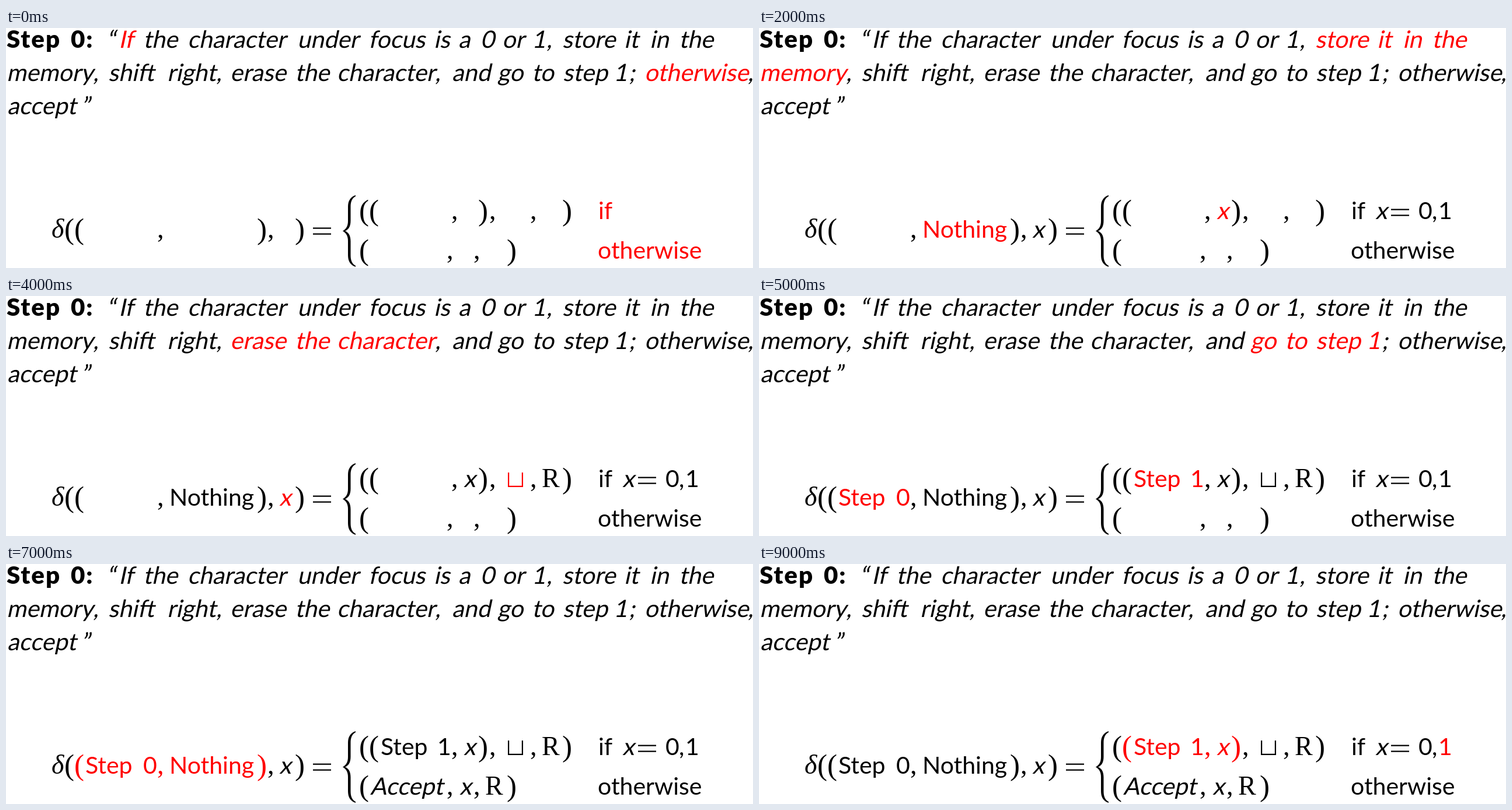
An HTML page that plays this animation: 1280x412 px, repeating every 10000 ms.

```html
<!DOCTYPE html>
<html lang="en">
<head>
<meta charset="utf-8">
<title>Transition function, step by step</title>
<style>
  html, body { margin: 0; width: 100%; height: 100%; overflow: hidden; background: #fff; }
  svg { display: block; width: 1280px; height: 412px; }
  .sans, .slanted { font: 41px Lato, sans-serif; }
  .bold { font: 900 42px Lato, sans-serif; letter-spacing: 2px; }
  .serif { font: 46px "Liberation Serif", serif; }
  .greek { font: italic 46px "Liberation Serif", serif; }
  .paren { font: 51px "Liberation Serif", serif; }
</style>
</head>
<body>
<svg id="stage" viewBox="0 0 1280 412"></svg>
<script>
const STEP_MS = 1000, STEPS = 10;
const stage = document.getElementById('stage');
const parts = [];

function add(tag, attrs, red, from) {
  const node = document.createElementNS('http://www.w3.org/2000/svg', tag);
  for (const name in attrs) node.setAttribute(name, attrs[name]);
  stage.append(node);
  parts.push({ node, red, from });
  return node;
}

// words: x position -> text; red: steps in which they are highlighted; from: first visible step
function put(style, y, words, red = [], from = 0) {
  for (const [x, word] of Object.entries(words)) {
    const skew = style === 'slanted' ? ' skewX(-12)' : '';
    add('text', { class: style, transform: `translate(${x} ${y})${skew}` }, red, from).textContent = word;
  }
}
const slanted = (...args) => put('slanted', ...args);
const sans = (...args) => put('sans', ...args);
const serif = (...args) => put('serif', ...args);
const paren = (y, ...args) => put('paren', y + 1.5, ...args);
const shape = (d, red = [], from = 0) => add('path', { d }, red, from);
const equals = (x, y, red, from) =>
  shape(`M${x} ${y - 17.5}h31v2.2h-31zM${x} ${y - 7.5}h31v2.2h-31z`, red, from);

// Sentence
const [L1, L2, L3] = [34, 91, 148];
put('bold', L1, { 1: 'Step', 111: '0:' });
slanted(L1, { 172: '“', 926: ',' });
slanted(L1, { 193: 'If' }, [0]);
slanted(L1, { 235: 'the', 311: 'character', 499: 'under', 621: 'focus', 733: 'is',
  775: 'a', 813: '0', 850: 'or', 901: '1' }, [1]);
slanted(L1, { 953: 'store', 1059: 'it', 1103: 'in', 1153: 'the' }, [2]);
slanted(L2, { 1: 'memory' }, [2]);
slanted(L2, { 149: ',', 360: ',', 735: ',', 764: 'and', 1067: ';', 1271: ',' });
slanted(L2, { 175: 'shift', 276: 'right' }, [3]);
slanted(L2, { 384: 'erase', 495: 'the', 567: 'character' }, [4]);
slanted(L2, { 842: 'go', 901: 'to', 954: 'step', 1041: '1' }, [5]);
slanted(L2, { 1094: 'otherwise' }, [0]);
slanted(L3, { 2: 'accept' }, [6]);
slanted(L3, { 128: '”' });

// Left-hand side
const MID = 360;
put('greek', MID, { 78: 'δ' });
paren(MID, { 100: '(', 495: ')' });
paren(MID, { 117: '(', 430: ')' }, [7]);
sans(MID, { 136: 'Step', 235: '0' }, [5, 7], 5);
serif(MID, { 259: ',' }, [7]);
sans(MID, { 280: 'Nothing' }, [2, 7], 2);
serif(MID, { 448: ',' });
slanted(MID, { 468: 'x' }, [1, 4], 1);
equals(526, MID);
shape('M599 287C590 290 586 297 586 307V331C586 340 583 345 577 348.5' +
  'C583 352 586 357 586 366V390C586 400 590 407 599 410V408' +
  'C593 405 590.5 399 590.5 390V366C590.5 356 587 351 581 348.5' +
  'C587 346 590.5 341 590.5 331V307C590.5 298 593 292 599 289Z');

// First case
const TOP = 328;
paren(TOP, { 605: '(', 953: ')' });
paren(TOP, { 622: '(', 809: ')' }, [8, 9]);
sans(TOP, { 642: 'Step', 739: '1' }, [5, 8, 9], 5);
serif(TOP, { 763: ',' }, [8, 9]);
slanted(TOP, { 784: 'x' }, [2, 8, 9], 2);
serif(TOP, { 828: ',', 898: ',' });
shape('M860 303h2.2v22.8h21.6v-22.8h2.2v25h-26z', [4], 4);
serif(TOP, { 918: 'R' }, [3], 3);
sans(TOP, { 1015: 'if' }, [0]);
slanted(TOP, { 1056: 'x' }, [1], 1);
equals(1083, TOP, [1], 1);
sans(TOP, { 1130: '0' }, [1, 8], 1);
sans(TOP, { 1153: ',' }, [1], 1);
sans(TOP, { 1164: '1' }, [1, 9], 1);

// Second case
const LOW = 396;
paren(LOW, { 605: '(', 858: ')' });
slanted(LOW, { 624: 'Accept' }, [6], 6);
serif(LOW, { 755: ',', 801: ',' });
slanted(LOW, { 777: 'x' }, [6], 6);
serif(LOW, { 821: 'R' }, [6], 6);
sans(LOW, { 1014: 'otherwise' }, [0]);

function draw(now) {
  const step = Math.floor(now / STEP_MS) % STEPS;
  for (const { node, red, from } of parts) {
    node.setAttribute('fill', red.includes(step) ? '#f00' : '#000');
    node.setAttribute('visibility', step < from ? 'hidden' : 'visible');
  }
  requestAnimationFrame(draw);
}
draw(performance.now());
</script>
</body>
</html>
```
